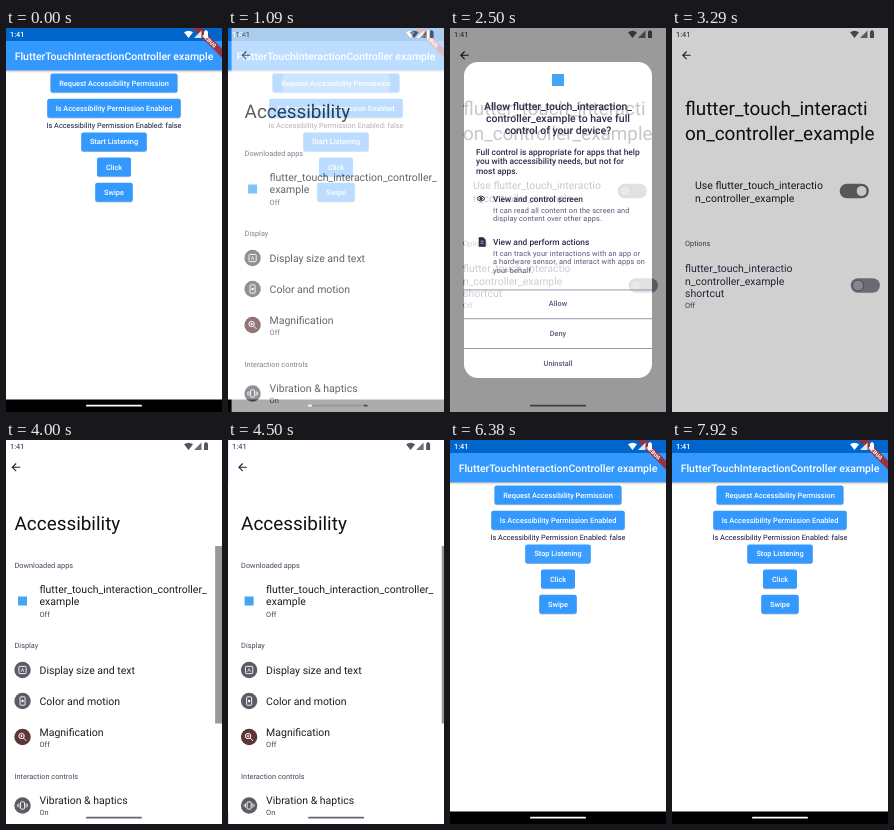
Recreate the animation shown at these times as an HTML page. Size 216 by 384 pixels, loop 8 s.

```html
<!DOCTYPE html>
<html lang="en">
<head>
<meta charset="utf-8">
<title>Accessibility permission flow</title>
<style>
html, body { margin: 0; width: 100%; height: 100%; overflow: hidden; background: #fff; }
svg { display: block; width: 100vw; height: 100vh; }
text { font-family: Roboto, "Noto Sans", sans-serif; text-rendering: geometricPrecision; white-space: pre; }
</style>
</head>
<body>
<svg id="stage" viewBox="0 0 216 384" xmlns="http://www.w3.org/2000/svg"></svg>
<script>
const LOOP = 8000;
const SMALL = 7.35, BODY = 8.4, ITEM = 10.5, HEAD = 18.9;
const INK = '#2b2b4a', SOFT = '#55557a', NOTE = '#44445c';

// Markup helpers
const text = (x, y, s, size, fill = '#222', extra = '') =>
  `<text x="${x}" y="${y}" font-size="${size}" fill="${fill}" ${extra}>${s.replace(/&/g, '&amp;')}</text>`;
const mid = (y, s, size, fill, extra = '') =>
  text(108, y, s, size, fill, `text-anchor="middle" font-weight="500" ${extra}`);
const rect = (x, y, w, h, fill, extra = '') =>
  `<rect x="${x}" y="${y}" width="${w}" height="${h}" fill="${fill}" ${extra}/>`;
const circle = (x, y, r, fill, extra = '') =>
  `<circle cx="${x}" cy="${y}" r="${r}" fill="${fill}" ${extra}/>`;
const path = (d, stroke, width = 1, fill = 'none') =>
  `<path d="${d}" stroke="${stroke}" stroke-width="${width}" fill="${fill}"/>`;
const group = (id, body) => `<g id="${id}">${body}</g>`;
const lines = (x, y, step, rows, size, fill, extra) =>
  rows.map((s, i) => text(x, y + i * step, s, size, fill, extra)).join('');

const statusBar = fill =>
  text(4, 9.2, '1:41', SMALL, fill, 'font-weight="500"') +
  `<g fill="${fill}">
    <path d="M178 4.3Q182.5 1 187 4.3L182.5 10Z"/>
    <path d="M188 10L195.5 2.5V10Z" fill-opacity=".85"/>
    <path d="M198 3.2h1v-.9h2v.9h1V10h-4Z"/>
  </g>`;

// App screen
const button = (y, w, label, id) =>
  rect(108 - w / 2, y - 8.8, w, 19, '#000', 'rx="2.2" opacity=".22"') +
  rect(108 - w / 2, y - 9.5, w, 19, '#3399ff', 'rx="2.1"') +
  (id ? `<clipPath id="${id}Clip">${rect(108 - w / 2, y - 9.5, w, 19, '#000', 'rx="2.1"')}</clipPath>
    <g clip-path="url(#${id}Clip)">${circle(108, y, 0, '#fff', `id="${id}"`)}</g>` : '') +
  mid(y + 2.5, label, SMALL, '#fff', id ? `id="${id}Label"` : '');

const banner = `<g transform="translate(216 0) rotate(45)">
  ${rect(-21, 14.7, 42, 6.3, '#a52a30', 'opacity=".9"')}
  <text x="0" y="19.8" font-size="5.4" font-weight="900" fill="#fff" text-anchor="middle">DEBUG</text></g>`;

const app =
  rect(0, 0, 216, 384, '#fff') +
  rect(0, 42, 216, 1.2, '#000', 'opacity=".25"') + rect(0, 43.2, 216, 1.2, '#000', 'opacity=".09"') +
  rect(0, 0, 216, 42.2, '#3399ff') + rect(0, 0, 216, 13, '#0066cc') +
  mid(31.6, 'FlutterTouchInteractionController example', ITEM, '#fff') +
  banner + statusBar('#fff') +
  button(55, 127, 'Request Accessibility Permission', 'request') +
  button(80.2, 133.5, 'Is Accessibility Permission Enabled') +
  mid(99.6, 'Is Accessibility Permission Enabled: false', SMALL, '#14143a', 'style="font-weight:400"') +
  button(113.9, 65.5, 'Start Listening', 'listen') +
  button(139, 34, 'Click') +
  button(164.2, 37.5, 'Swipe') +
  rect(0, 371.5, 216, 12.5, '#000') + rect(80, 376.8, 56, 1.8, '#fff', 'rx=".9"');

// Settings pages
const arrow = path('M18.6 27.3H11M14.6 23.5L10.8 27.3L14.6 31.1', '#222', 1.1);
const section = (y, s) => text(13, y, s, SMALL, NOTE);
const item = (y, s) => text(38, y, s, ITEM, '#1c1c26');
const note = (x, y, s) => text(x, y, s, SMALL, NOTE);
const badge = (y, glyph, fill = '#5c5c66') =>
  circle(21, y, 8.2, fill) + `<g transform="translate(21 ${y})">${glyph}</g>`;
const box = (x, y, w, h) =>
  `<rect x="${x}" y="${y}" width="${w}" height="${h}" rx=".8" fill="none" stroke="#fff" stroke-width=".9"/>`;

const listPage =
  `<clipPath id="rowClip">${rect(0, 135.5, 216, 51.5, '#000')}</clipPath>
  <g clip-path="url(#rowClip)">${circle(98.3, 161.5, 0, '#c6c6c6', 'id="rowTap"')}</g>` +
  arrow + text(13, 89.8, 'Accessibility', HEAD, '#111') +
  section(127.6, 'Downloaded apps') +
  rect(16.5, 156.5, 9, 9, '#42a5f5') +
  lines(38, 153, 12.4, ['flutter_touch_interaction_controller_', 'example'], ITEM, '#1c1c26') + note(38, 176.6, 'Off') +
  section(208, 'Display') +
  badge(230, box(-3.6, -3.6, 7.2, 7.2) + '<text y="2" font-size="5.5" fill="#fff" text-anchor="middle">A</text>') +
  item(233.8, 'Display size and text') +
  badge(261, box(-2.5, -4.2, 5, 8.4) + circle(0, 0, 1.2, '#fff')) + item(264.8, 'Color and motion') +
  badge(297, circle(-1, -1, 2.7, 'none', 'stroke="#fff" stroke-width="1"') +
    path('M1 1L4 4M-2.3 -1H.3M-1 -2.3V.3', '#fff', .9), '#5e3436') +
  item(296.2, 'Magnification') + note(38, 306.8, 'Off') +
  section(338.6, 'Interaction controls') +
  badge(365.5, box(-2, -3.6, 4, 7.2) + path('M-3.6 -2.2V2.2M3.6 -2.2V2.2M-5 -1.2V1.2M5 -1.2V1.2', '#fff', .8)) +
  item(364.2, 'Vibration & haptics') + note(38, 375.2, 'On') +
  rect(213.6, 106, 12, 177.5, '#999');

const toggle = (x, y, id) =>
  rect(x - 14.6, y - 7.3, 29.2, 14.6, '#82828c', `rx="7.3" id="${id}Track"`) +
  circle(x - 7.3, y, 5.5, '#a4a4b0', `id="${id}Thumb" stroke="#55555f" stroke-width=".9"`);

const detailPage =
  arrow +
  lines(13, 86.8, 25, ['flutter_touch_interacti', 'on_controller_example'], HEAD, '#111') +
  lines(23, 161.2, 12.4, ['Use flutter_touch_interactio', 'n_controller_example'], ITEM, '#1c1c26') +
  toggle(182.3, 163, 'use') +
  section(218, 'Options') +
  lines(13, 244.2, 12.4, ['flutter_touch_interactio', 'n_controller_example', 'shortcut'], ITEM, '#2c2c44') +
  note(13, 280, 'Off') + toggle(193.3, 257.5, 'shortcut');

// Permission dialog; the page behind lingers on it while it opens
const bold = 'font-weight="500"', loose = 'letter-spacing=".15"';
const rule = y => rect(14, y, 188, .9, '#8a8aa4');
const dialog =
  rect(14, 34, 188, 316, '#fff', 'rx="14"') +
  '<use href="#detail" id="linger"/>' +
  rect(102, 46, 12, 12, '#42a5f5') +
  mid(81.5, 'Allow flutter_touch_interaction_', ITEM, INK) +
  mid(93.7, 'controller_example to have full', ITEM, INK) +
  mid(106, 'control of your device?', ITEM, INK) +
  lines(26, 126.5, 9.6, ['Full control is appropriate for apps that help',
    'you with accessibility needs, but not for', 'most apps.'], BODY, INK, 'font-weight="500" textLength-adjust="none"'.split(' textLength')[0]) +
  path('M27 170.5Q31 165.5 35 170.5Q31 175.5 27 170.5Z', INK, 1) + circle(31, 170.5, 1.6, INK) +
  text(43, 174, 'View and control screen', BODY, INK, bold) +
  lines(43, 184.8, 8.6, ['It can read all content on the screen and', 'display content over other apps.'], SMALL, SOFT, loose) +
  path('M29 209.5h4.2l2.2 2.2v6.8h-6.4Z', INK, .6, INK) + path('M30.6 213.2h3M30.6 215.4h3', '#fff', .6) +
  text(43, 217, 'View and perform actions', BODY, INK, bold) +
  lines(43, 227.8, 8.6, ['It can track your interactions with an app or',
    'a hardware sensor, and interact with apps on', 'your behalf.'], SMALL, SOFT, loose) +
  rule(261.5) + rule(290.3) + rule(320) +
  circle(108, 275, 0, '#888', 'id="allowTap"') +
  mid(277.6, 'Allow', SMALL, SOFT) + mid(308, 'Deny', SMALL, SOFT) + mid(338, 'Uninstall', SMALL, SOFT);

document.getElementById('stage').innerHTML = app + group('settings',
  rect(0, 0, 216, 384, '#fff') + group('list', listPage) + group('detail', detailPage) +
  statusBar('#55555c') + rect(80, 376.8, 56, 1.8, '#66666e', 'rx=".9" id="pill"') +
  rect(0, 0, 216, 384, '#000', 'id="shade"') + group('dialog', dialog));

const el = {};
document.querySelectorAll('[id]').forEach(n => { el[n.id] = n; });
const set = (id, attrs) => { for (const k in attrs) el[id].setAttribute(k, attrs[k]); };

// Motion helpers
const ramp = (t, a, b) => Math.min(1, Math.max(0, (t - a) / (b - a)));
const out = p => 1 - (1 - p) ** 3;
const show = (id, opacity, x = 0) => set(id, {
  opacity, transform: `translate(${x})`, display: opacity > 0 ? 'inline' : 'none'
});

function tap(id, t, start, r0, r1, grow, alpha) {
  const live = t >= start;
  const fade = 1 - ramp(t, start + grow * .6, start + grow);
  set(id, { r: live ? r0 + (r1 - r0) * ramp(t, start, start + grow) : 0, opacity: live ? alpha * fade : 0 });
}

function setToggle(id, x, on) {
  set(id + 'Track', { fill: on > .5 ? '#6a6a70' : '#82828c' });
  set(id + 'Thumb', { cx: x - 7.3 + 14.6 * on, fill: on > .5 ? '#f4f4f4' : '#a4a4b0' });
}

function render(t) {
  tap('request', t, 820, 8, 75, 400, .3);
  tap('listen', t, 6000, 6, 40, 400, .3);
  el.listenLabel.textContent = t < 6150 ? 'Start Listening' : 'Stop Listening';

  // App <-> settings
  const enter = ramp(t, 960, 1260), leave = ramp(t, 4480, 4760);
  show('settings', ramp(enter, .1, .6) * (1 - ramp(leave, .2, .8)), 20 * (1 - out(enter)) + 20 * leave * leave);

  // List <-> detail
  const go = ramp(t, 1900, 2180), back = ramp(t, 3820, 4280);
  const returning = t >= 3820;
  show('list',
    returning ? ramp(back, .08, .35) : 1 - ramp(go, 0, .35),
    returning ? -20 * (1 - out(back)) : -20 * go * go);
  show('detail', ramp(go, .3, .75) * (1 - ramp(back, 0, .25)), 20 * (1 - out(go)) + 20 * out(back));
  tap('rowTap', t, 1690, 12, 64, 400, 1);

  // Dialog
  const pop = ramp(t, 2370, 2540), shut = ramp(t, 3120, 3240);
  show('dialog', ramp(pop, .1, .6) * (1 - shut));
  set('linger', { opacity: 1 - pop });
  tap('allowTap', t, 2950, 5, 26, 300, .35);
  set('shade', { opacity: .4 * out(pop) * (1 - ramp(t, 3240, 3335)) });
  set('pill', { opacity: 1 - ramp(t, 3120, 3200) + ramp(t, 3820, 3900) });
  setToggle('use', 182.3, ramp(t, 3140, 3260));
}

function frame(now) {
  render(now % LOOP);
  requestAnimationFrame(frame);
}
render(0);
requestAnimationFrame(frame);
</script>
</body>
</html>
```
